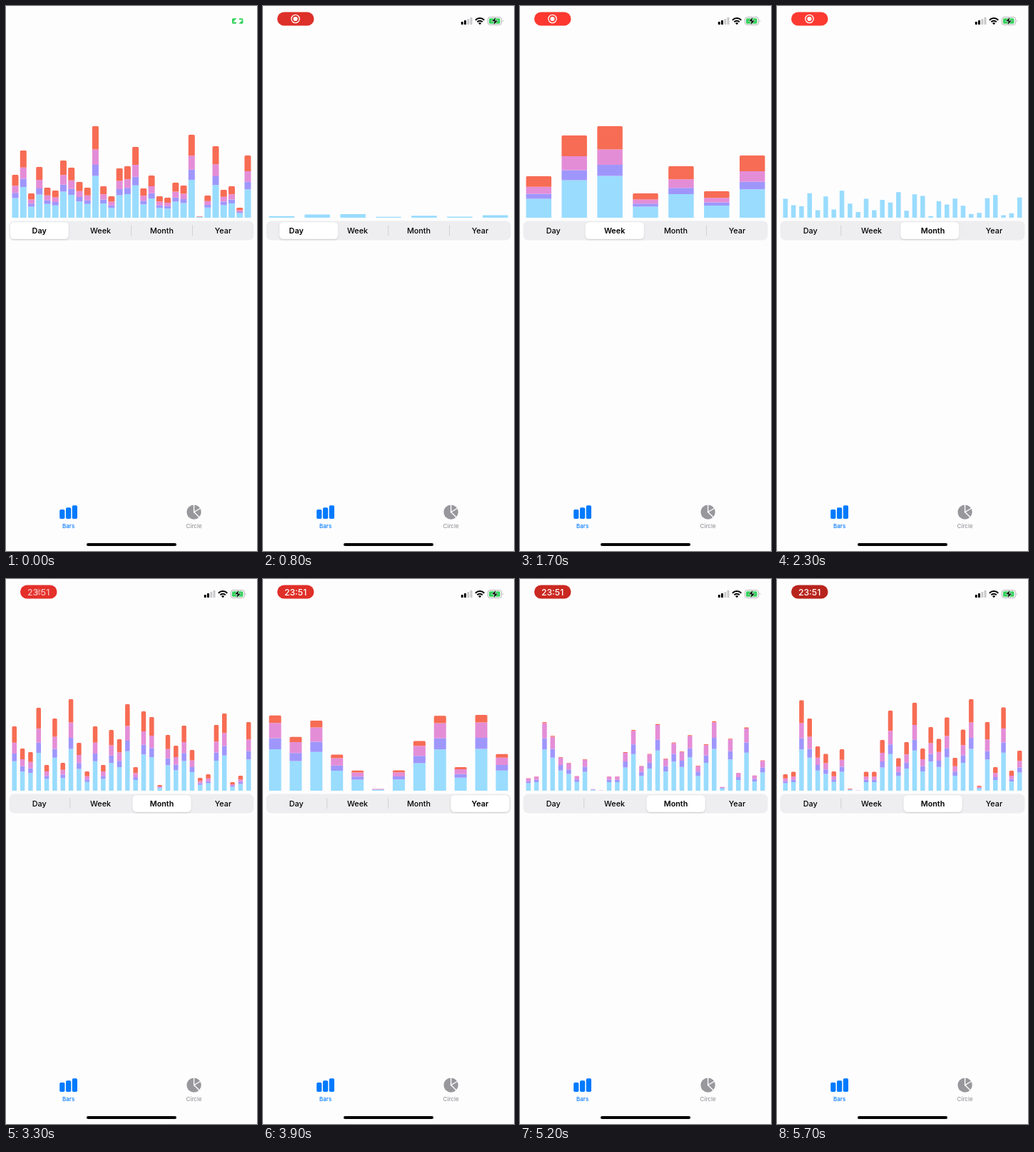
Write an HTML page that moves like this. It is 352 px wide and 762 px high and loops after 5800 ms.

```html
<!DOCTYPE html>
<html lang="en">
<head>
<meta charset="utf-8">
<title>Stacked bar charts</title>
<style>
  html, body { margin: 0; width: 100%; height: 100%; overflow: hidden; background: #fefdfe; }
  svg { display: block; width: 100%; height: 100%; }
  text { font-family: Inter, "Liberation Sans", sans-serif; text-anchor: middle; }
</style>
</head>
<body>
<svg viewBox="0 0 352 762">
  <defs>
    <filter id="shadow" x="-10%" y="-25%" width="120%" height="160%">
      <feDropShadow dx="0" dy="1" stdDeviation="1.3" flood-color="#000" flood-opacity=".16"/>
    </filter>
  </defs>
  <rect width="352" height="762" fill="#fefdfe"/>

  <g id="pill">
    <rect id="pillShape" x="20" y="8.5" width="51.5" height="19" rx="9.5"/>
    <g id="record">
      <circle r="5.7" fill="none" stroke="#fff" stroke-width="1.3"/>
      <circle r="3.1" fill="#fff"/>
    </g>
    <text id="clock" x="45.6" y="22.5" font-size="12.2" font-weight="500" fill="#fff">23:51</text>
  </g>

  <g id="battery">
    <rect x="317" y="17.2" width="15.5" height="7.6" rx="1.6" fill="#35d15c"/>
    <path id="boltGap" d="M326.8 15l-6.3 6.6h3.8l-1.2 5.4 6.5-6.8h-4z" fill="#fff" stroke="#fff" stroke-width="1.8"/>
  </g>
  <g id="ink">
    <rect x="277.8" y="22" width="3" height="4" rx=".8"/>
    <rect x="282" y="20" width="3" height="6" rx=".8"/>
    <g fill="#c9c8ca">
      <rect x="286.3" y="18" width="3" height="8" rx=".8"/>
      <rect x="290.5" y="15.8" width="3" height="10.2" rx=".8"/>
    </g>
    <g fill="none" stroke="#000" stroke-width="2">
      <path d="M297.9 19.7a8.7 8.7 0 0 1 12.4 0"/>
      <path d="M300.4 22.2a5.2 5.2 0 0 1 7.4 0"/>
    </g>
    <path d="M304.1 26.2l-2.1-2.2a3 3 0 0 1 4.2 0z"/>
    <rect x="315.4" y="15.6" width="19.2" height="10.8" rx="3.1" fill="none" stroke="#a9a8aa" stroke-width=".9"/>
    <path d="M336 19.2q1.6 1.8 0 3.6z" fill="#a9a8aa"/>
    <path d="M326.8 15l-6.3 6.6h3.8l-1.2 5.4 6.5-6.8h-4z" stroke="#fefdfe" stroke-width=".6"/>
  </g>

  <g id="chart"></g>

  <rect x="4.5" y="300.5" width="343" height="27" rx="7" fill="#eeedef"/>
  <g id="separators"></g>
  <rect id="thumb" y="302.2" width="82" height="23.6" rx="5.5" fill="#fff" filter="url(#shadow)"/>
  <g id="labels" font-size="10.8"></g>

  <g fill="#007aff">
    <rect x="75.2" y="704" width="7.2" height="13" rx="1.8"/>
    <rect x="84" y="701.2" width="7.2" height="15.8" rx="1.8"/>
    <rect x="92.8" y="698.2" width="7.2" height="18.8" rx="1.8"/>
    <text x="87.6" y="729.6" font-size="8" font-weight="500">Bars</text>
  </g>
  <g fill="#98979b">
    <circle cx="263.6" cy="707.6" r="10.2"/>
    <path d="M263.6 697v10.6l9.6-5.6M263.6 707.6l7.6 7.4" fill="none" stroke="#fefdfe" stroke-width="1.4"/>
    <text x="263.6" y="729.6" font-size="8" font-weight="500">Circle</text>
  </g>
  <rect x="113" y="751" width="126" height="4" rx="2"/>
</svg>

<script>
const LOOP = 5800, STEP = 100;
const BASE = 296, LEFT = 8.5, RIGHT = 343.5;
const THUMB_X = 5.8, SEGMENT = 85.9;
const THUMB_MS = 330, GROW_MS = 720;

// Share of each bar, from the bottom up.
const LAYERS = [['#99dcfe', .457], ['#9f96fc', .122], ['#e48dd7', .168], ['#f76c54', .253]];

const day = { width: 9, heights: [60, 94, 34, 71, 42, 38, 80, 70, 50, 42, 128, 44, 30, 69, 72,
  99, 41, 59, 30, 28, 49, 45, 116, 2, 31, 100, 39, 44, 14, 87] };
const week = { width: 35.5, heights: [58, 115, 128, 34, 72, 37, 87] };
const monthA = { width: 6.5, heights: [90, 59, 54, 116, 36, 101, 39, 128, 67, 27, 90, 36, 85, 72, 121,
  33, 111, 103, 8, 78, 63, 91, 57, 18, 23, 92, 108, 12, 21, 96] };
const year = { width: 17, heights: [127, 91, 118.5, 61, 34, 3, 34.5, 84, 126.5, 40, 128, 62] };
const monthB = { width: 6.5, heights: [23, 26.5, 126.5, 101, 62, 51.5, 27, 58, 3, .6, 26.5, 26.5, 71, 112, 45.5,
  68, 123, 59, 89, 72.5, 102.5, 46, 85.5, 128, 7, 96, 33, 116.5, 28, 56] };

const moves = [
  { to: 0, thumbAt: -2000, growAt: -2000, chart: day },
  { to: 1, thumbAt: 705, growAt: 714, chart: week },
  { to: 2, thumbAt: 2015, growAt: 2041, chart: monthA },
  { to: 3, thumbAt: 3340, growAt: 3370, chart: year },
  { to: 2, thumbAt: 4608, growAt: 4710, chart: monthB },
];

// Pulse of the recording pill: time, then red, green, blue.
const pulse = [[0, 221, 48, 41], [800, 221, 48, 41], [1700, 252, 56, 48], [2300, 252, 58, 49],
  [3300, 228, 48, 42], [4700, 219, 45, 39], [5700, 184, 36, 29]];

const $ = id => document.getElementById(id);
const clamp = v => Math.min(1, Math.max(0, v));
const ease = v => { v = clamp(v); return v * v * (3 - 2 * v); };
const set = (node, attrs) => { for (const k in attrs) node.setAttribute(k, attrs[k]); return node; };
const add = (parent, tag, attrs) =>
  parent.appendChild(set(document.createElementNS('http://www.w3.org/2000/svg', tag), attrs));

const layers = LAYERS.map(([fill]) => add($('chart'), 'path', { fill }));
const separators = [1, 2, 3].map(i => add($('separators'), 'rect',
  { x: 3.4 + SEGMENT * i, y: 306.5, width: .9, height: 14.5, fill: '#cfced1' }));
const labels = ['Day', 'Week', 'Month', 'Year'].map((name, i) => {
  const label = add($('labels'), 'text', { x: 46.7 + SEGMENT * i, y: 317.8 });
  label.textContent = name;
  return label;
});

function block(x, width, bottom, top, radius) {
  const r = Math.min(radius, bottom - top);
  return `M${x} ${bottom}V${top + r}q0 ${-r} ${r} ${-r}h${width - 2 * r}q${r} 0 ${r} ${r}V${bottom}z`;
}

function drawChart({ width, heights }, grown) {
  const pitch = (RIGHT - LEFT - width) / (heights.length - 1);
  let from = 0;
  LAYERS.forEach(([, share], n) => {
    const to = Math.min(from + share, grown);
    const radius = n === LAYERS.length - 1 ? 1.6 : 0;
    const d = to > from
      ? heights.map((h, i) => block(LEFT + i * pitch, width, BASE - h * from, BASE - h * to, radius)).join('')
      : '';
    set(layers[n], { d });
    from += share;
  });
}

function drawControl(t) {
  let pos = 0;
  for (const m of moves) pos += (m.to - pos) * ease((t - m.thumbAt) / THUMB_MS);
  set($('thumb'), { x: THUMB_X + SEGMENT * pos });
  separators.forEach((s, i) => set(s, { opacity: clamp((Math.abs(pos - i - .5) - .5) * 2) }));
  labels.forEach((l, i) => set(l, { 'font-weight': i === Math.round(pos) ? 600 : 500 }));
}

function pulseColor(t) {
  const next = Math.max(1, pulse.findIndex(p => p[0] >= t));
  const a = pulse[next - 1], b = pulse[next];
  const k = ease((t - a[0]) / (b[0] - a[0]));
  return `rgb(${[1, 2, 3].map(i => Math.round(a[i] + (b[i] - a[i]) * k))})`;
}

function drawStatus(t) {
  const shown = ease(t / 400);
  const clock = ease((t - 3130) / 270);
  set($('ink'), { opacity: shown });
  set($('boltGap'), { opacity: 1 - shown });
  set($('pill'), { opacity: shown });
  set($('pillShape'), { fill: pulseColor(t) });
  set($('clock'), { opacity: clock });
  set($('record'), { opacity: 1 - clock, transform: `translate(45.5 18) scale(${1 - .4 * clock})` });
}

function render(time) {
  const t = Math.floor((time % LOOP) / STEP) * STEP;
  const move = moves.filter(m => m.growAt <= t).pop();
  drawChart(move.chart, ease((t - move.growAt) / GROW_MS));
  drawControl(t);
  drawStatus(t);
}

const start = performance.now();
function tick() {
  render(performance.now() - start);
  requestAnimationFrame(tick);
}
tick();
</script>
</body>
</html>
```
